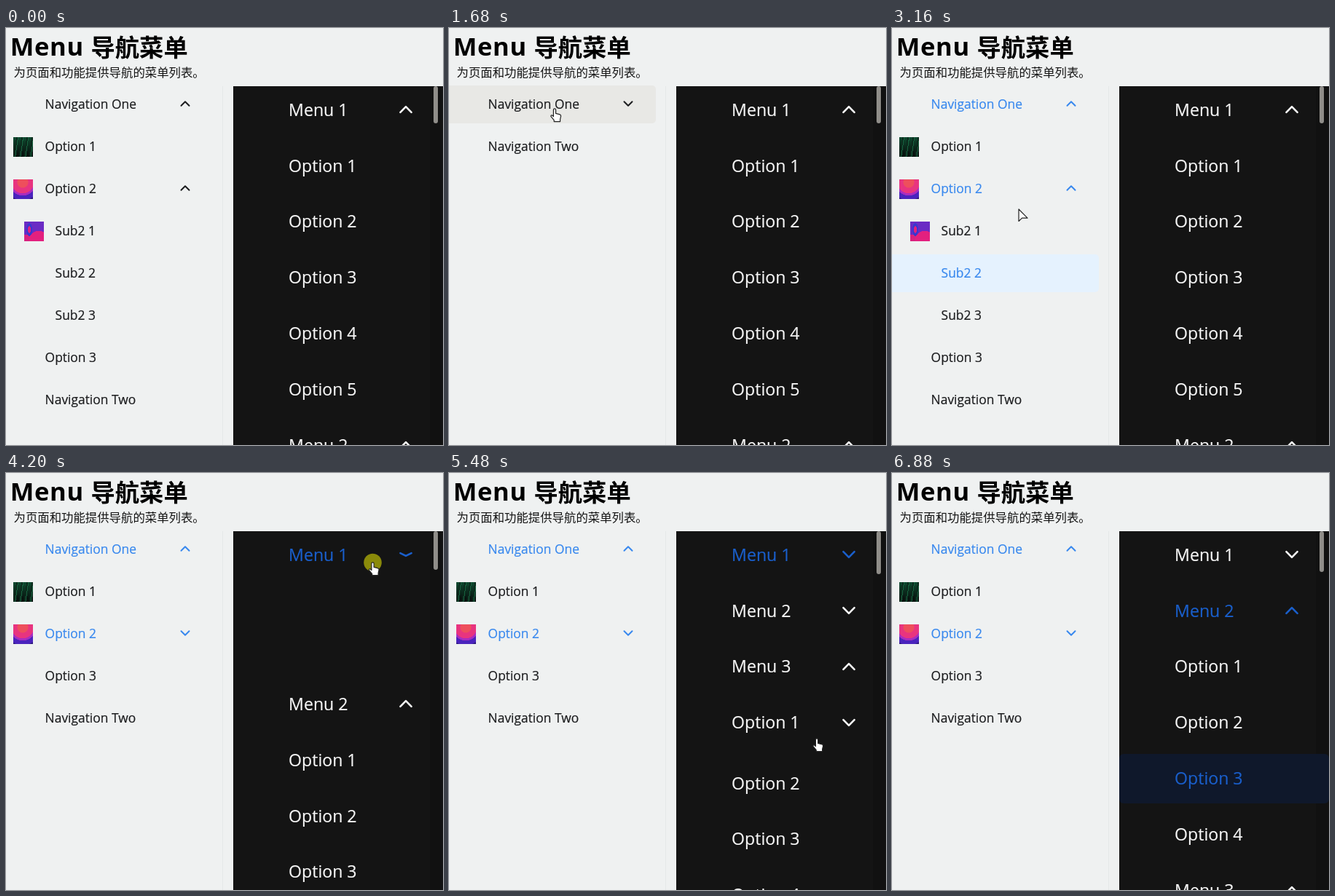
An HTML page for the animation above (6960 ms loop, 600 by 573 pixels).

```html
<!DOCTYPE html>
<html lang="zh">
<head>
<meta charset="utf-8">
<title>Menu</title>
<style>
html, body { margin: 0; width: 100%; height: 100%; overflow: hidden; background: #eff1f1; }
body { position: relative; font-family: "Open Sans", "Noto Sans", sans-serif; }
.menu, .kids { display: flex; flex-direction: column; }
.kids { overflow: hidden; }
.menu > *, .kids > * { flex-shrink: 0; }
.row { position: relative; white-space: nowrap; -webkit-text-stroke: .2px currentColor; }
.row span { position: absolute; }
.row svg { position: absolute; overflow: visible; fill: none; stroke: currentColor; stroke-linecap: round; stroke-linejoin: round; }
.row path { vector-effect: non-scaling-stroke; }
#left { position: absolute; left: 0; top: 75.5px; width: 284px; color: #1c1d1f; font-size: 17.4px; }
#left .row { height: 52.1px; margin: 3px 0; line-height: 51.6px; border-radius: 0 5px 5px 0; }
#left .hover { background: #e8e8e5; }
#left .on { color: #3888ee; }
#left .active { background: #e5f2fe; }
#line { position: absolute; left: 297px; top: 80px; width: 1px; height: 493px; background: #e5e8e8; }
#panel { position: absolute; left: 311.5px; top: 79.5px; width: 288.5px; height: 493.5px; overflow: hidden; background: linear-gradient(90deg, #141414 270px, #111 270px); }
#right { margin-top: -5px; color: #f6f6f6; font-size: 23.1px; }
#right .row { height: 68px; margin: 4.4px 0; line-height: 67.4px; border-radius: 6px; }
#right .on { color: #1a5fcb; }
#right .active { background: #0f182b; }
#thumb { position: absolute; left: 275px; top: .5px; width: 6.5px; border-radius: 3px; background: #8f8d89; }
.pic { position: absolute; top: 13.3px; width: 27px; height: 27px; }
.leaf { background: repeating-linear-gradient(98deg, #0000 0 4px, #0b2a1c 4px 6px, #17623f 6px 7px), linear-gradient(#0e4a30, #08130f 85%); }
.sun { background: radial-gradient(circle at 13px 4px, #ee4f5c 0 7px, #e8347f 8px 15px, #a92cc0 15.5px 18px, #4a24bd 18.5px 24px, #2c1a7c 25px); }
.hill { background: radial-gradient(circle at 20px 26px, #e3207f 0 13px, #0000 13.5px), radial-gradient(ellipse 4px 9px at 7px 11px, #e3207f 0 50%, #3a36cf 55% 100%, #0000 101%), linear-gradient(#6a2bc4 65%, #d8227f 66%); }
#over { position: absolute; left: 0; top: 0; width: 600px; height: 573px; overflow: hidden; pointer-events: none; }
.cjk { font-family: "Noto Sans CJK SC", "Noto Sans CJK", sans-serif; }
</style>
</head>
<body>
<div id="left" class="menu"></div>
<div id="line"></div>
<div id="panel">
  <div id="right" class="menu"></div>
  <div id="thumb"></div>
</div>
<svg id="over" viewBox="0 0 600 573">
  <text x="5.7" y="38" font-size="34.6" font-weight="700" letter-spacing=".7">Menu</text>
  <text class="cjk" x="116.5" y="38.5" font-size="33.3" font-weight="700">导航菜单</text>
  <text class="cjk" x="10.5" y="67" font-size="16.4" fill="#151515">为页面和功能提供导航的菜单列表。</text>
  <g id="cursor" stroke="#222" stroke-width="1.2" stroke-linejoin="round" fill="#fff">
    <circle id="press" r="12.3" fill="#ff0" fill-opacity=".5" stroke="none"/>
    <path id="arrow" d="M0 0V16.5L4.5 12.2H12Z"/>
    <path id="hand" d="M-1.6 1.4a1.6 1.6 0 0 1 3.2 0V6.4l5.6 1.4Q8.6 8.2 8.6 10L7.6 14.5V17.6H-.8V15.6L-5 10.6Q-5.4 8.6-3.6 8.8L-1.6 10.6Z"/>
  </g>
</svg>
<script>
const LOOP = 6960, FOLD = 240, PRESS = 190;
const $ = id => document.getElementById(id);
const clamp = v => Math.max(0, Math.min(1, v));
const ease = v => { v = clamp(v); return v * v * (3 - 2 * v); };

const node = (label, kids, opt) => ({ label, kids, toggles: [], ...opt });
const options = (n, from = 1) => Array.from({ length: n }, (_, i) => node(`Option ${from + i}`));

const sub1 = node('Sub2 1', null, { pic: 'hill', picX: 25, indent: 14 });
const sub2 = node('Sub2 2', null, { indent: 14 });
const sub3 = node('Sub2 3', null, { indent: 14 });
const opt2 = node('Option 2', [sub1, sub2, sub3], { pic: 'sun', toggles: [710, 2100, 3250] });
const nav1 = node('Navigation One', [node('Option 1', null, { pic: 'leaf' }), opt2, node('Option 3')],
  { toggles: [1280, 1700] });
const menu1 = node('Menu 1', options(5), { toggles: [4054] });
const menu2 = node('Menu 2', options(4), { toggles: [4640, 5980] });
const nested = node('Option 1', [node('Sub 1', null, { indent: 18 }), node('Sub 2', null, { indent: 18 })],
  { toggles: [5271] });
const menu3 = node('Menu 3', [nested, ...options(4, 2)]);

const sides = [
  { el: $('left'), items: [nav1, node('Navigation Two')], pitch: 58.1, textX: 53.6,
    chevron: { x: 246, y: 25.7, w: 5.5, h: 2.8, stroke: 2 },
    picks: [[2760, sub2]] },
  { el: $('right'), items: [menu1, menu2, menu3, node('Menu 4')], pitch: 76.8, textX: 76.6,
    chevron: { x: 237.2, y: 33.4, w: 7.6, h: 3.9, stroke: 2.6 },
    picks: [[3640, menu1.kids[1]], [5620, menu3.kids[1]], [6270, menu2.kids[0]], [6620, menu2.kids[2]]] }
];

// time, x, y of the pointer
const path = [
  [150, 215, 585], [600, 205, 226], [730, 205, 226], [1120, 147, 112], [1720, 145, 111],
  [2040, 190, 222], [2180, 190, 222], [2640, 176, 338], [2900, 172, 340], [3160, 174, 249],
  [3220, 205, 224], [3340, 212, 224], [3580, 450, 272], [3700, 452, 272], [3960, 503.5, 123],
  [4240, 503.5, 123], [4520, 505, 185], [4720, 505, 196], [5160, 505, 364], [5480, 505, 365],
  [5580, 500, 424], [5680, 500, 424], [5920, 480, 195], [6060, 476, 198], [6220, 463, 270],
  [6320, 461, 274], [6480, 460, 354], [6580, 456, 424], [6640, 456, 426], [6720, 463, 442],
  [6860, 582, 590]
];
const clicks = sides.flatMap(s => s.picks.map(p => p[0]))
  .concat([opt2, nav1, menu1, menu2, nested].flatMap(n => n.toggles));

function build(n, parent, box, side) {
  n.parent = parent;
  n.row = box.appendChild(document.createElement('div'));
  n.row.className = 'row';
  if (n.pic) {
    const pic = n.row.appendChild(document.createElement('div'));
    pic.className = 'pic ' + n.pic;
    pic.style.left = (n.picX || 10) + 'px';
  }
  const text = n.row.appendChild(document.createElement('span'));
  text.textContent = n.label;
  text.style.left = side.textX + (n.indent || 0) + 'px';
  if (!n.kids) return;
  const { x, y, w, h, stroke } = side.chevron;
  n.row.insertAdjacentHTML('beforeend',
    `<svg width="1" height="1" style="left:${x}px;top:${y}px" stroke-width="${stroke}"><path d="M${-w} ${h}L0 ${-h}L${w} ${h}"/></svg>`);
  n.chevron = n.row.querySelector('path');
  n.box = box.appendChild(document.createElement('div'));
  n.box.className = 'kids';
  n.kids.forEach(k => build(k, n, n.box, side));
}
sides.forEach(s => s.items.forEach(n => build(n, null, s.el, s)));

// 1 is open, 0 is folded; each toggle reverses it
function openness(n, t) {
  return n.toggles.reduce((v, at, i) => v + (i % 2 ? 1 : -1) * ease((t - at) / FOLD), 1);
}

function layout(n, t, side, active) {
  let height = side.pitch;
  let on = n === active;
  for (let a = active; a && !on; a = a.parent) on = a === n;
  n.row.classList.toggle('on', on);
  n.row.classList.toggle('active', n === active);
  if (n.kids) {
    const open = openness(n, t);
    const full = n.kids.reduce((sum, k) => sum + layout(k, t, side, active), 0);
    n.box.style.height = full * open + 'px';
    n.box.style.opacity = clamp(1 - 1.5 * (1 - open));
    n.chevron.setAttribute('transform', `scale(1 ${Math.cos(Math.PI * (1 - open))})`);
    height += full * open;
  }
  return height;
}

function pointer(t) {
  const i = path.findIndex(p => p[0] > t);
  if (i < 1) return null;
  const [t0, x0, y0] = path[i - 1], [t1, x1, y1] = path[i];
  const k = ease((t - t0) / (t1 - t0));
  return [x0 + (x1 - x0) * k, y0 + (y1 - y0) * k];
}

let hovered = null, fullHeight = 0;
function render(t) {
  const heights = sides.map(s => {
    const pick = s.picks.filter(p => p[0] <= t).pop();
    return s.items.reduce((sum, n) => sum + layout(n, t, s, pick && pick[1]), 0);
  });
  fullHeight = Math.max(fullHeight, heights[1]);
  $('thumb').style.height = 51 + (fullHeight - heights[1]) / 108 + 'px';

  const at = pointer(t);
  if (hovered) hovered.classList.remove('hover');
  const hit = at && document.elementFromPoint(at[0], at[1]);
  hovered = hit && hit.closest('.row');
  if (hovered) hovered.classList.add('hover');

  $('cursor').style.display = at ? '' : 'none';
  if (!at) return;
  $('cursor').setAttribute('transform', `translate(${at})`);
  $('hand').style.display = hovered ? '' : 'none';
  $('arrow').style.display = hovered ? 'none' : '';
  $('press').style.display = clicks.some(c => t >= c && t < c + PRESS) ? '' : 'none';
}

render(0);
const start = performance.now();
(function tick() {
  render((performance.now() - start) % LOOP);
  requestAnimationFrame(tick);
})();
</script>
</body>
</html>
```
